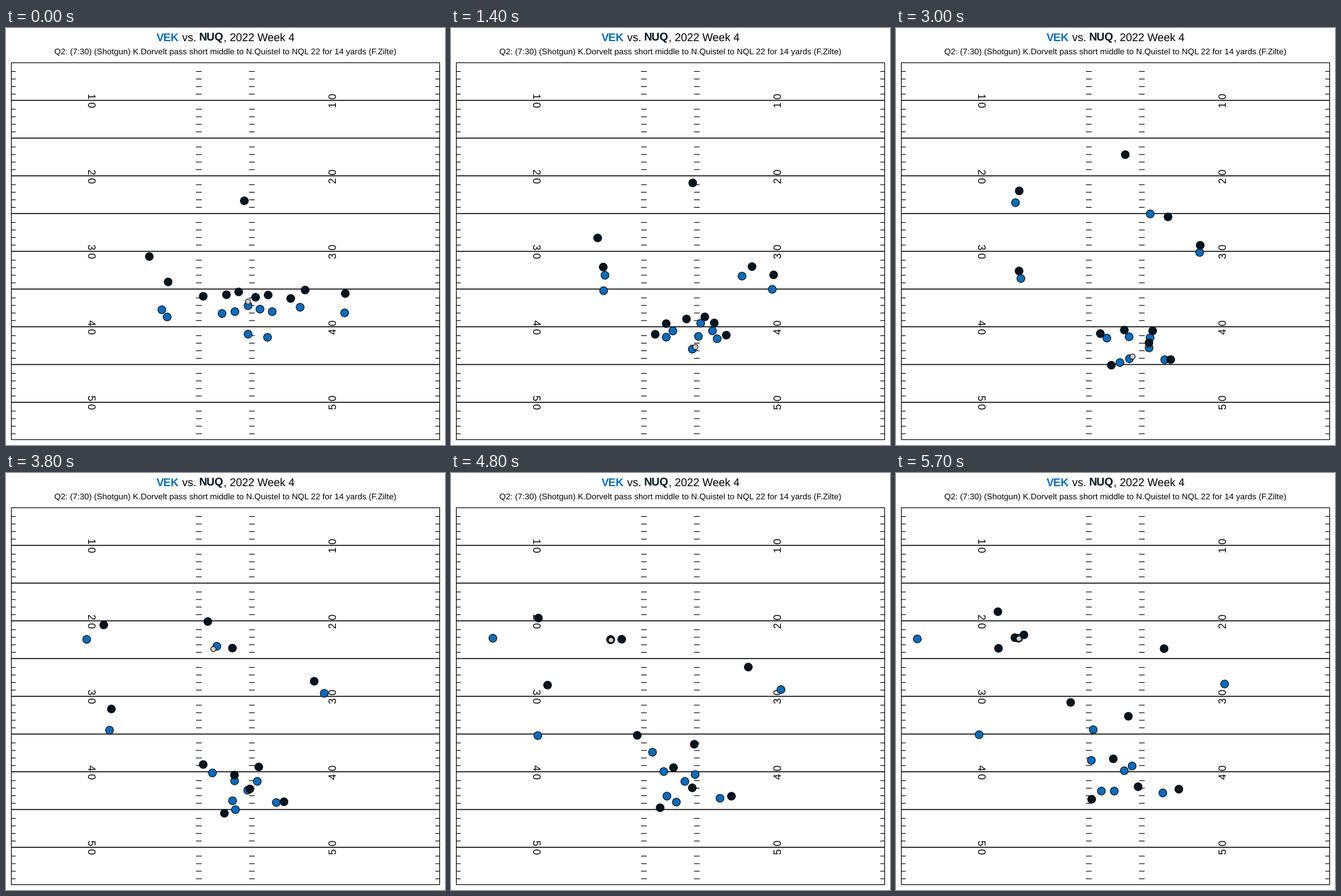
A matplotlib script for the animation above (8300 ms loop, 700 by 666 pixels).

```python
import numpy as np
import matplotlib.pyplot as plt
from matplotlib.animation import FuncAnimation

W, H, DPI = 700, 666, 100
PX = 72 / DPI                     # points per pixel
STEP, FRAMES = 100, 83
SNAP, END = 250, 5700             # players move between these times
SNAPPED, THROWN, CAUGHT = 600, 3000, 3800

BLUE, NAVY, LEATHER = "#0b6cbd", "#021520", "#cfcbc5"

plt.rcParams.update({
    "font.family": "Liberation Sans",
    "text.hinting": "none",
    "path.snap": False,
})

# Key points of each path, evenly spaced in time
ROUTES = [
    [(469, 446), (460, 384), (407, 298), (288, 270), (195.5, 264)],      # slot
    [(540, 455), (507, 409), (484, 359), (523, 350), (524, 337)],        # wide right
    [(248.5, 450), (242, 381), (192, 280), (89, 265), (34, 265)],        # seam left
    [(257, 461.5), (239, 413), (200, 400), (146, 418), (132.5, 418)],    # flat left
]
POCKET = [
    [(386, 489), (381.5, 527), (360, 523), (327.5, 508)],                # passer
    [(417, 494), (379, 491.5), (363, 491), (311.5, 459)],                # back
    [(344.5, 456), (345, 519), (366, 537.5), (348, 508)],                # line, left to right
    [(365, 453), (345, 500), (328.5, 477), (314.5, 410)],
    [(386, 443.5), (405, 489), (400, 492), (376.5, 468)],
    [(405, 449), (420, 505), (384, 506), (364, 475.5)],
    [(424.5, 453), (425, 523), (431, 526), (425.5, 511)],
]
SAFETY = [(380, 276), (385, 241), (366.5, 202), (286, 261), (189.5, 263)]

# Gap to the matched opponent: at the snap, when closed up, at the end
COVERAGE = [
    [(8, -27.5), (29, 5), (8.5, -5.5)],
    [(1, -31), (4, -10), (-96.5, -56.5)],
    [(-20, -85), (2, -18), (128.5, -43.5)],
    [(1.5, -56), (-4, -8), (31, -138)],
]
RUSH = [
    [(-46, -72.5), (-9, -11), (35, -2.5)],
    [(-30, -27.5), (-13, 4), (-36, 13)],
    [(-13.5, -27), (-9.5, -6), (-36, -43.5)],
    [(12, -13.5), (4.5, -9), (-6, -79.5)],
    [(13, -22.5), (-1, -9), (22, 25.5)],
    [(29.5, -21), (9, 0), (25.5, -6)],
]


def ramp(t, t0, t1):
    return np.clip((t - t0) / (t1 - t0), 0, 1)


def smooth(u):
    return u * u * (3 - 2 * u)


def glide(paths, t):
    """Points on smooth curves through evenly spaced keys, starting from rest."""
    keys = np.array(paths, float).swapaxes(0, 1)
    vel = np.gradient(keys, axis=0)
    vel[0] = 0
    u = ramp(t, SNAP, END) * (len(keys) - 1)
    i = min(int(u), len(keys) - 2)
    u -= i
    return (keys[i] + (keys[i + 1] - keys[i]) * smooth(u)
            + u * (1 - u) * ((1 - u) * vel[i] - u * vel[i + 1]))


def shadow(gaps, marks, t, closed):
    """Close in on the marks, stay with them, then pursue the ball."""
    start, near, end = np.array(gaps, float).swapaxes(0, 1)
    return (marks + start + (near - start) * smooth(ramp(t, SNAP, closed))
            + (end - near) * ramp(t, 2600, END) ** 1.7)


def offense_at(t):
    return np.vstack([glide(ROUTES, t), glide(POCKET, t)])


def defense_at(t):
    return np.vstack([
        shadow(RUSH, glide(POCKET, t)[1:], t, 2000),
        glide([SAFETY], t),
        shadow(COVERAGE, glide(ROUTES, t), t, 3000),
    ])


def held(t):
    return glide(POCKET, t)[0] + (5, -3.5)


def run(t):
    tucked = ramp(t, CAUGHT, CAUGHT + 1000)
    return glide(ROUTES, t)[0] + np.array([-6, 4]) * (1 - tucked) + (0.5, 0.5)


def ball_at(t):
    if t < SNAPPED:
        spot = np.array([386, 437])
        return spot + (held(SNAPPED) - spot) * t / SNAPPED
    if t < THROWN:
        return held(t)
    if t < CAUGHT:
        return held(THROWN) + (run(CAUGHT) - held(THROWN)) * ramp(t, THROWN, CAUGHT)
    return run(t)


fig = plt.figure(figsize=(W / DPI, H / DPI), dpi=DPI, facecolor="white")
ax = fig.add_axes((0, 0, 1, 1))
ax.set(xlim=(0, W), ylim=(H, 0))
ax.axis("off")

LEFT, RIGHT, TOP, BOTTOM = 8.5, 691.5, 55.5, 657.5


def yard_y(n):
    return 55.3 + 12.054 * n


def draw_field():
    ax.add_patch(plt.Rectangle((LEFT, TOP), RIGHT - LEFT, BOTTOM - TOP,
                               fill=False, ec="black", lw=1.1 * PX))
    ax.hlines([yard_y(n) for n in range(5, 50, 5)], LEFT, RIGHT,
              color="black", lw=1.5 * PX)
    ticks = [yard_y(n) + 2.1 for n in range(50) if n % 5]
    for x0, x1 in ((LEFT, 15.5), (303, 312), (387.5, 396.5), (684.5, RIGHT)):
        ax.hlines(ticks, x0, x1, color="black", lw=1.1 * PX)
    for n in range(1, 6):
        y = yard_y(10 * n - 5)
        for x, angle in ((128.8, -90), (528.2, 90)):
            ax.text(x, y, f"{n} 0", size=16.5 * PX, rotation=angle,
                    rotation_mode="anchor", ha="center", va="baseline")


def draw_title(parts, y, size):
    texts = [ax.text(0, y, s, color=c, weight=w, size=size * PX, va="baseline")
             for s, c, w in parts]
    widths = [t.get_window_extent().width for t in texts]
    x = (W - sum(widths)) / 2
    for text, width in zip(texts, widths):
        text.set_x(x)
        x += width


def dots(count, color, radius, z):
    return [ax.add_patch(plt.Circle((0, 0), radius, fc=color, ec="black", lw=PX, zorder=z))
            for _ in range(count)]


draw_field()
draw_title([("VEK", BLUE, "bold"), (" vs. ", "black", "normal"),
            ("NUQ", NAVY, "bold"), (", 2022 Week 4", "black", "normal")], 20.6, 17.6)
draw_title([("Q2: (7:30) (Shotgun) K.Dorvelt pass short middle to N.Quistel "
             "to NQL 22 for 14 yards (F.Zilte)", "black", "normal")], 42, 13.24)

blue = dots(11, BLUE, 6.3, 3)
navy = dots(11, NAVY, 6.3, 4)
ball = dots(1, LEATHER, 4.2, 5)


def update(n):
    t = min(n * STEP, END)
    spots = np.vstack([offense_at(t), defense_at(t), ball_at(t)])
    for dot, spot in zip(blue + navy + ball, spots):
        dot.center = spot
    return blue + navy + ball


anim = FuncAnimation(fig, update, frames=FRAMES, interval=STEP,
                     repeat=True, repeat_delay=0, blit=False)
plt.show()
```
